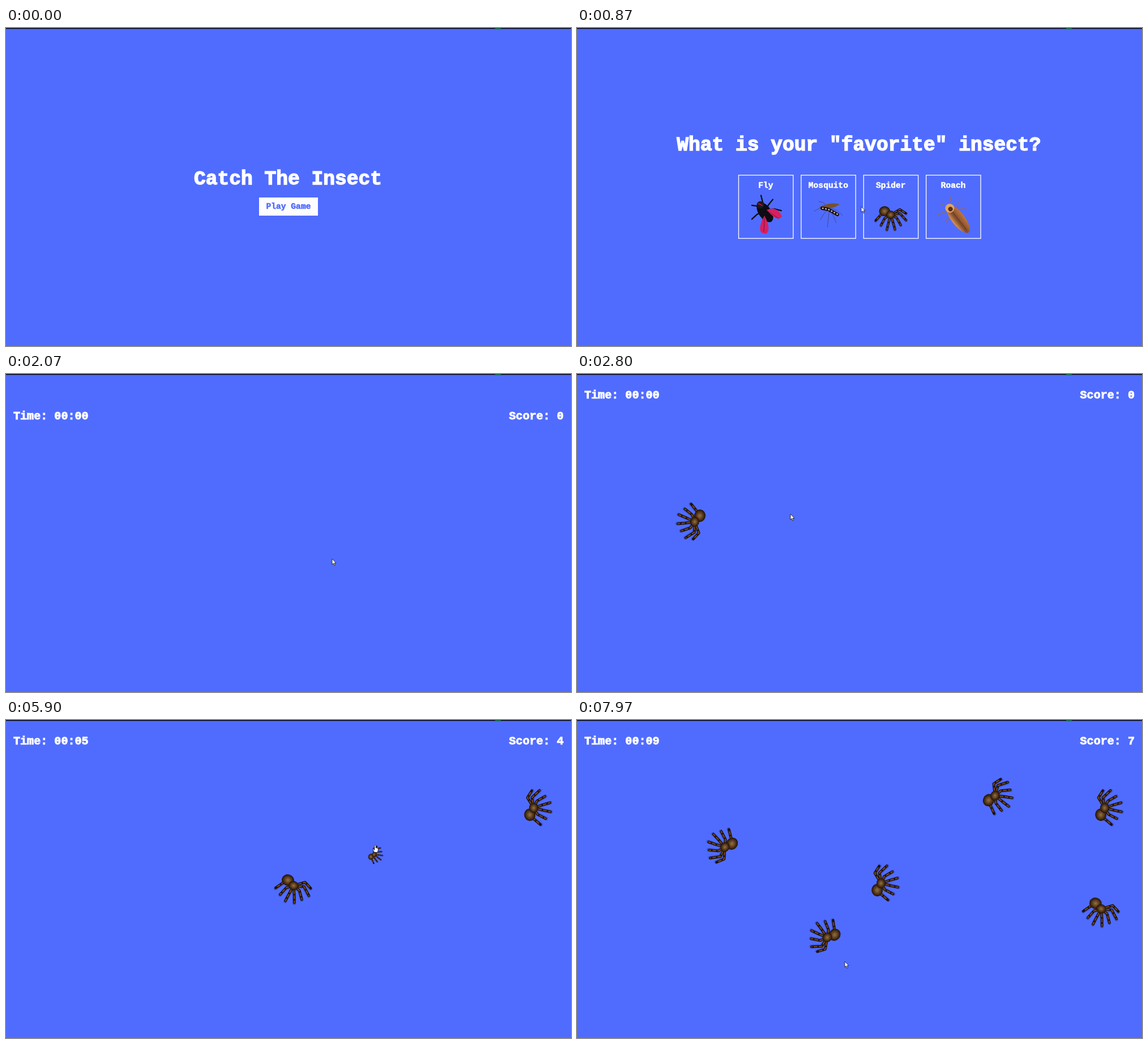
Write an HTML page that moves like this. It is 998 px wide and 561 px high and loops after 8 s.

```html
<!DOCTYPE html>
<html lang="en">
<head>
<meta charset="utf-8">
<title>Catch The Insect</title>
<style>
  html, body { margin: 0; height: 100%; overflow: hidden; background: #506cff; }
  svg { display: block; width: 100vw; height: 100vh; }
  text { font: bold 14.6px "Liberation Mono", "DejaVu Sans Mono", monospace; fill: #fff; stroke: #fff; stroke-width: .5; white-space: pre; }
  .mid { text-anchor: middle; }
  .title { font-size: 34.6px; stroke-width: 1.5; }
  .hud { font-size: 20.1px; stroke-width: .9; }
  .blue, .card.hover text { fill: #506cff; stroke: #506cff; }
  .card rect { fill: none; stroke: #fff; stroke-width: 1.3; }
  .card.hover rect { fill: #fdfdfd; }
  .line { fill: none; stroke-linecap: round; stroke-linejoin: round; }
</style>
</head>
<body>
<svg viewBox="0 0 998 561" preserveAspectRatio="none">
  <defs>
    <linearGradient id="shell"><stop stop-color="#e0954e"/><stop offset=".4" stop-color="#7d4a2e"/><stop offset="1" stop-color="#c4753a"/></linearGradient>
    <radialGradient id="fur"><stop stop-color="#96703f"/><stop offset=".5" stop-color="#5f4020"/><stop offset="1" stop-color="#1e1108"/></radialGradient>
    <path id="legs" class="line"/>
    <g id="spider">
      <use href="#legs" stroke="#000" stroke-opacity=".2" stroke-width="6.5" y="1"/>
      <use href="#legs" stroke="#1d1008" stroke-width="4.6"/>
      <use href="#legs" stroke="#7a5028" stroke-width="1.8" stroke-dasharray="5 4"/>
      <ellipse cx="-12" cy="-11" rx="11" ry="10" fill="url(#fur)"/>
      <ellipse cx="0" cy="-4" rx="9" ry="8" fill="url(#fur)"/>
    </g>
  </defs>

  <g id="world">
    <text class="mid title" x="498" y="276">Catch The Insect</text>
    <rect id="play" x="447" y="299" width="104" height="32" fill="#fdfdff"/>
    <text class="mid blue" x="499" y="319">Play Game</text>

    <g transform="translate(0 561)">
      <text class="mid title" x="498" y="216">What is your "favorite" insect?</text>
      <g id="cards"></g>

      <g transform="translate(332 325)">
        <path id="flyLegs" class="line" stroke="#0c0c12" stroke-width="2.3"/>
        <ellipse rx="20" ry="11" transform="rotate(55)" fill="#0c0c12"/>
        <circle cx="-8" cy="-13" r="6.5" fill="#191921"/>
        <path class="line" d="M-11-15L-5-12" stroke="#a5152c" stroke-width="2.5"/>
        <path d="M3-4Q22-12 30 8Q22 18 3-4M-1 6Q12 30 2 38Q-18 38-1 6" fill="#d81f5e"/>
        <path class="line" d="M5-2L24 11M-1 9L-2 34" stroke="#7c1238"/>
      </g>

      <g transform="translate(446 321)">
        <path id="mosquitoLegs" class="line" stroke="#3d3344" stroke-width=".9" stroke-opacity=".65"/>
        <path d="M-18-5Q2-15 18-10Q6-1-16-2" fill="#76522f"/>
        <path class="line" d="M-13-3L-2-1L14 8" stroke="#17121a" stroke-width="6"/>
        <path class="line" d="M-12-3L-2-1L15 8" stroke="#d8c6a0" stroke-width="2.5" stroke-dasharray=".5 5"/>
      </g>

      <use href="#spider" transform="translate(554 333) scale(.89)"/>

      <g transform="translate(664 325)">
        <path id="roachLegs" class="line" stroke="#a1663f" stroke-width="1.1"/>
        <g transform="rotate(-38)">
          <ellipse cy="15" rx="11.5" ry="30" fill="url(#shell)"/>
          <path d="M0-6V40" stroke="#4a2618" stroke-width=".8"/>
          <ellipse cy="-9" rx="8" ry="8" fill="#e0a464"/>
          <circle cy="-7" r="4" fill="#592f1b"/>
        </g>
      </g>
    </g>

    <g transform="translate(0 1122)">
      <text class="hud" id="time" x="13" y="43"></text>
      <text class="hud" id="score" x="985" y="43" text-anchor="end"></text>
      <g id="spiders"></g>
    </g>
  </g>

  <path d="M0 .7H998" stroke="#05060a" stroke-width="1.5"/>
  <path d="M864 .5H874" stroke="#0a8f1c"/>

  <g id="cursor" fill="#fff" stroke="#111" stroke-width=".8" stroke-linejoin="round">
    <path id="arrow" d="M0 0V10L2.3 7.9L3.9 11.8L5.5 11.1L3.9 7.4H7Z"/>
    <path id="hand" d="M-1.2 1Q0-.8 1.2 1V5L4 5.5Q5.6 6 5.3 8L4.3 13H-1.3L-4.2 8.5Q-4.2 6.8-2.6 7.6L-1.2 9Z"/>
  </g>
</svg>
<script>
const LOOP = 8000, HEIGHT = 561, SLIDE = 300, SHRINK = 180, TRAVEL = 240, REACH = 33;
const SECOND = 595; // one second of game time, in ms

// Where the pointer stops: arrival, x, y and, if it clicks there, the click time
const stops = [
  [-TRAVEL, 560, 575], [230, 502, 315, 370], [1470, 576, 326, 1830], [2620, 377, 247],
  [3060, 207, 258, 3100], [4450, 615, 282, 4700], [4960, 598, 276, 5020], [5740, 653, 220, 5810],
  [6130, 508, 294, 6370], [6720, 640, 418, 6750], [7400, 478, 435, 7480], [7800, 473, 426]
].map(([at, x, y, click]) => ({ at, x, y, click }));
const [play, choose, ...hunts] = stops.filter(s => s.click);

// Places and angles in order of appearance
const spiders = [
  [204, 260, 100], [592, 273, -125], [635, 294, -122], [652, 238, -66], [507, 296, 14],
  [936, 155, -91], [541, 288, -91], [640, 420, 30], [478, 437, 150], [742, 135, -66],
  [925, 337, 14], [258, 222, 124], [439, 381, 130]
].map(([x, y, angle]) => ({ x, y, angle, caught: Infinity }));

// The choice brings one spider, each catch two more
const births = [choose.click + SECOND, ...hunts.flatMap(h => [h.click + SECOND, h.click + 1.5 * SECOND])];
spiders.forEach((s, i) => s.born = births[i]);
const near = (s, x, y) => Math.hypot(x - s.x, y - s.y) < REACH;
for (const { x, y, click } of hunts) {
  const hit = spiders.filter(s => s.born < click && s.caught > click && near(s, x, y)).pop();
  if (hit) hit.caught = click;
}

const $ = id => document.getElementById(id);
const clamp = v => Math.max(0, Math.min(1, v));
const easeOut = v => 1 - (1 - clamp(v)) ** 1.667;
const easeInOut = v => (v = clamp(v), v * v * (3 - 2 * v));
const show = (el, on) => el.setAttribute('display', on ? 'inline' : 'none');
const inside = (x, y, left, top, w, h) => x >= left && x <= left + w && y >= top && y <= top + h;

// A fan of bent legs; diagonal ones are shorter
function legFan(id, count, from, to, rx, ry, lift) {
  let d = '';
  for (let i = 0; i < count; i++) {
    const a = (from + (to - from) * i / (count - 1)) * Math.PI / 180;
    const size = 1 - .2 * Math.abs(Math.sin(2 * a));
    const x = rx * size * Math.cos(a), y = ry * size * Math.sin(a);
    d += `M0-4L${x * .6} ${y * .6 - lift * Math.abs(Math.cos(a))}L${x} ${y}`;
  }
  $(id).setAttribute('d', d);
}
legFan('legs', 7, 163, -15, 35, 29, 11);
legFan('flyLegs', 6, 105, 355, 30, 34, 4);
legFan('mosquitoLegs', 6, 215, 20, 28, 32, 5);
legFan('roachLegs', 7, 80, 350, 29, 30, 3);

const cardLeft = i => 285.5 + i * 110.4;
$('cards').innerHTML = ['Fly', 'Mosquito', 'Spider', 'Roach'].map((name, i) =>
  `<g class="card"><rect x="${cardLeft(i)}" y="259.6" width="96.4" height="111.6"/>
   <text class="mid" x="${cardLeft(i) + 48}" y="282">${name}</text></g>`).join('');
$('spiders').innerHTML = spiders.map(() => '<use href="#spider"/>').join('');
const cards = [...$('cards').children], sprites = [...$('spiders').children];

function pointer(t) {
  let { x, y } = stops[0];
  stops.forEach((s, i) => {
    if (!i) return;
    const prev = stops[i - 1];
    const travel = Math.min(TRAVEL, s.at - (prev.click || prev.at));
    const k = easeInOut((t - s.at + travel) / travel);
    x += (s.x - x) * k;
    y += (s.y - y) * k;
  });
  return [x, y];
}

function draw(t) {
  const scroll = HEIGHT * (easeOut((t - play.click) / SLIDE) + easeOut((t - choose.click) / SLIDE));
  $('world').setAttribute('transform', `translate(0 ${-scroll})`);

  const [x, y] = pointer(t), pageY = y + scroll;
  let hot = inside(x, pageY, 447, 299, 104, 32);
  $('play').setAttribute('opacity', hot ? .9 : 1);

  cards.forEach((card, i) => {
    const over = inside(x, pageY, cardLeft(i), HEIGHT + 259, 97, 113);
    card.classList.toggle('hover', over);
    hot ||= over;
  });

  spiders.forEach((s, i) => {
    const alive = t >= s.born && t < s.caught + SHRINK;
    show(sprites[i], alive);
    if (!alive) return;
    const scale = 1 - easeInOut((t - s.caught) / SHRINK);
    sprites[i].setAttribute('transform', `translate(${s.x} ${s.y}) rotate(${s.angle}) scale(${scale})`);
    hot ||= near(s, x, y);
  });

  const seconds = Math.max(0, Math.floor((t - choose.click) / SECOND) - 1);
  $('time').textContent = 'Time: 00:' + String(seconds).padStart(2, '0');
  $('score').textContent = 'Score: ' + spiders.filter(s => t >= s.caught).length;

  $('cursor').setAttribute('transform', `translate(${x} ${y})`);
  show($('arrow'), !hot);
  show($('hand'), hot);
}

function tick() {
  draw(performance.now() % LOOP);
  requestAnimationFrame(tick);
}
tick();
</script>
</body>
</html>
```
